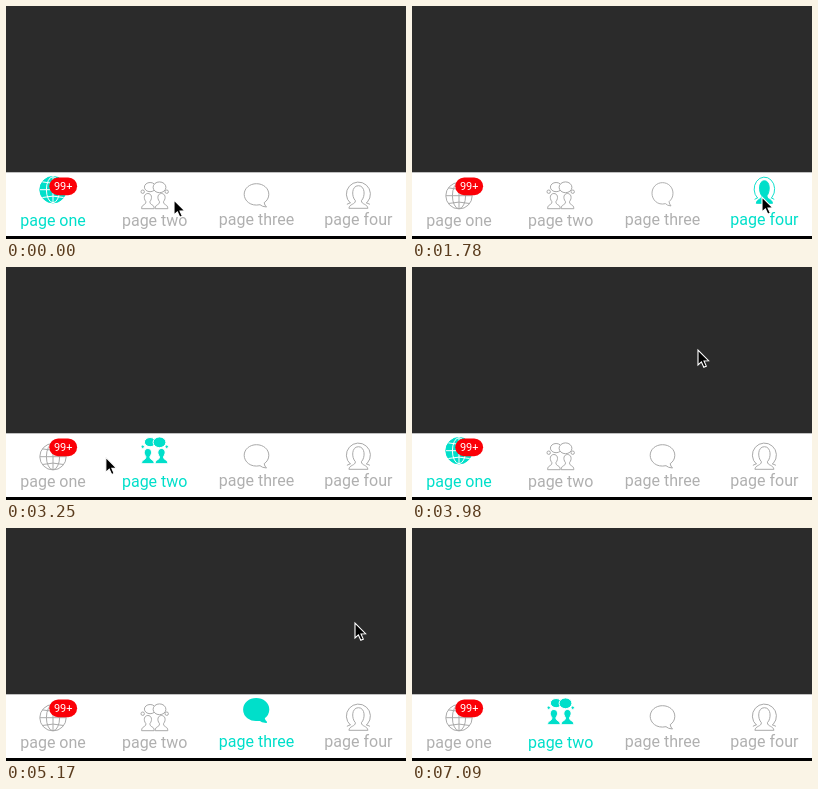
Write an HTML page with a canvas that moves like this. It is 400 px wide and 233 px high and loops after 7840 ms.

```html
<!DOCTYPE html>
<html lang="en">
<head>
<meta charset="utf-8">
<title>Bottom tab bar</title>
<style>
  html, body { margin: 0; width: 100%; height: 100%; overflow: hidden; background: #2b2b2b; }
  canvas { display: block; width: 400px; height: 233px; }
</style>
</head>
<body>
<canvas id="stage"></canvas>
<script>
const W = 400, H = 233, LOOP = 7840, FLIP = 400;
const TEAL = '#00dfca', GRAY = '#a9a9a9', LABEL = '#b0b0b0', RED = '#fb0007';

const canvas = document.getElementById('stage');
const ctx = canvas.getContext('2d');
const dpr = window.devicePixelRatio || 1;
canvas.width = W * dpr;
canvas.height = H * dpr;

const ANCHORS = [0, 1200, 2360, 3540, 4720, 5910, 7090];
const STEPS = [];
for (let i = 0; i < ANCHORS.length - 1; i++) {
  const span = ANCHORS[i + 1] - ANCHORS[i];
  for (let j = 0; j < 8; j++) STEPS.push(Math.round((ANCHORS[i] + span * j / 8) / 10) * 10);
}
STEPS.push(7090);

// [start time, tab]
const PICKS = [
  [-1000, 0], [180, 1], [640, 2], [1450, 3], [2260, 2], [2850, 1],
  [3390, 0], [4240, 1], [4720, 2], [5400, 3], [6310, 2], [6650, 1]
];

// [time, x, y] of the pointer tip
const POINTER = [
  [0, 168, 194], [250, 168, 194], [600, 256, 192], [800, 266, 191],
  [1050, 286, 191], [1400, 350, 191], [1800, 350, 191], [2360, 230, 190],
  [2500, 226, 190], [2800, 150, 191], [3000, 146, 191], [3390, 74, 190],
  [3540, 62, 188], [3700, 80, 170], [3980, 286, 83], [4080, 352, 84],
  [4290, 36, 96], [4560, 351, 92], [4740, 67, 90], [5020, 345, 90],
  [5170, 349, 95], [5230, 345, 95], [5440, 70, 84], [5760, 68, 81],
  [5910, 22, 70], [6060, 24, 68], [6210, 126, 76], [6350, 300, 88],
  [6520, 60, 80], [6700, 260, 86], [6900, 300, 90]
];
const POINTER_END = 6900;

const TABS = [
  { x: 47, base: 220, text: 'page one', icon: globe },
  { x: 148.7, base: 219.5, text: 'page two', icon: people },
  { x: 250.5, base: 219, text: 'page three', icon: bubble },
  { x: 352.4, base: 219, text: 'page four', icon: person }
];

const clamp = v => Math.max(0, Math.min(1, v));

function ellipse(x, y, rx, ry) {
  ctx.beginPath();
  ctx.ellipse(x, y, rx, ry, 0, 0, Math.PI * 2);
}

function paint(on) {
  ctx.fillStyle = on ? TEAL : '#fff';
  ctx.fill();
  ctx.stroke();
}

function globe(on) {
  ellipse(0, 0, 13.2, 13.2);
  paint(on);
  if (on) ctx.strokeStyle = '#fff';
  ellipse(0, 0, 6.6, 13);
  ctx.stroke();
  ctx.beginPath();
  ctx.moveTo(0, -13);
  ctx.lineTo(0, 13);
  ctx.moveTo(-13, 0);
  ctx.lineTo(13, 0);
  for (const s of [-1, 1]) {
    ctx.moveTo(-10.6, 7.8 * s);
    ctx.quadraticCurveTo(0, 5 * s, 10.6, 7.8 * s);
  }
  ctx.stroke();
}

function people(on) {
  if (on) ctx.strokeStyle = '#fff';
  ellipse(-4.6, -8.6, 5.7, 4.6);
  paint(on);
  ellipse(4.8, -8.4, 6.4, 5.4);
  paint(on);
  for (const s of [-1, 1]) {
    ellipse(12 * s, -4, 1.7, 1.7);
    paint(on);
    const x = 6.8 * s;
    ctx.beginPath();
    ctx.moveTo(x - 6.3, 13);
    ctx.bezierCurveTo(x - 6.3, 8, x - 2, 10, x - 2, 6);
    ctx.bezierCurveTo(x - 5, 2, x - 3.5, -2.2, x, -2.2);
    ctx.bezierCurveTo(x + 3.5, -2.2, x + 5, 2, x + 2, 6);
    ctx.bezierCurveTo(x + 2, 10, x + 6.3, 8, x + 6.3, 13);
    ctx.closePath();
    paint(on);
  }
}

function bubble(on) {
  if (on) ctx.translate(-0.3, -0.8);
  ctx.beginPath();
  ctx.moveTo(10, 11.3);
  ctx.quadraticCurveTo(5.5, 11, 3.5, 9);
  ctx.bezierCurveTo(-6, 11, -12.3, 5, -12.3, -1.4);
  ctx.bezierCurveTo(-12.3, -7.5, -6.8, -12, 0, -12);
  ctx.bezierCurveTo(6.8, -12, 12.3, -7.5, 12.3, -1.4);
  ctx.bezierCurveTo(12.3, 2.4, 10.5, 5, 7.7, 7);
  ctx.quadraticCurveTo(8, 9.5, 10, 11.3);
  ctx.closePath();
  if (on) ctx.lineWidth = 1.6;
  paint(on);
}

function person(on) {
  ctx.beginPath();
  ctx.arc(0, -1.6, 12, Math.PI * 0.73, Math.PI * 2.27);
  ctx.moveTo(-11.5, 8.6);
  ctx.lineTo(-7.8, 7);
  ctx.moveTo(11.5, 8.6);
  ctx.lineTo(7.8, 7);
  ctx.stroke();
  ctx.beginPath();
  ctx.moveTo(-9.5, 12.6);
  ctx.bezierCurveTo(-9, 8, -3, 9, -3, 5);
  ctx.bezierCurveTo(-7, 1, -7, -10, 0, -10);
  ctx.bezierCurveTo(7, -10, 7, 1, 3, 5);
  ctx.bezierCurveTo(3, 9, 9, 8, 9.5, 12.6);
  ctx.closePath();
  paint(on);
}

// 0 = resting, 1 = selected
function selection(i, t) {
  let n = 0;
  while (n + 1 < PICKS.length && PICKS[n + 1][0] <= t) n++;
  const p = clamp((t - PICKS[n][0]) / FLIP);
  if (PICKS[n][1] === i) return p;
  return n && PICKS[n - 1][1] === i ? 1 - p : 0;
}

function drawTab(tab, k) {
  const on = k > 0.5;
  ctx.save();
  ctx.translate(tab.x, 189.7 - 6 * k);
  ctx.scale(Math.max(0.02, Math.abs(Math.cos(k * Math.PI))), 1);
  ctx.lineWidth = 1;
  ctx.lineJoin = 'round';
  ctx.strokeStyle = on ? TEAL : GRAY;
  tab.icon(on);
  ctx.restore();

  ctx.font = '16px Roboto, sans-serif';
  ctx.textAlign = 'center';
  ctx.fillStyle = on ? TEAL : LABEL;
  ctx.fillText(tab.text, tab.x, tab.base);
}

function drawBadge() {
  ctx.beginPath();
  ctx.roundRect(43.3, 171.4, 27.8, 17.8, 8.9);
  ctx.fillStyle = RED;
  ctx.fill();
  ctx.font = '11px Roboto, sans-serif';
  ctx.fillStyle = '#fff';
  ctx.fillText('99+', 57.2, 184.4);
}

function drawPointer(t) {
  if (t >= POINTER_END) return;
  let n = 0;
  while (POINTER[n + 1][0] <= t) n++;
  const [t0, x0, y0] = POINTER[n], [t1, x1, y1] = POINTER[n + 1];
  const p = (t - t0) / (t1 - t0);
  ctx.save();
  ctx.translate(x0 + (x1 - x0) * p, y0 + (y1 - y0) * p);
  ctx.beginPath();
  ctx.moveTo(0, 0);
  ctx.lineTo(0, 15);
  ctx.lineTo(3.4, 11.9);
  ctx.lineTo(5.8, 17.2);
  ctx.lineTo(8.3, 16.1);
  ctx.lineTo(6, 10.9);
  ctx.lineTo(10.6, 10.7);
  ctx.closePath();
  ctx.fillStyle = '#000';
  ctx.fill();
  ctx.strokeStyle = '#fff';
  ctx.lineWidth = 1.1;
  ctx.stroke();
  ctx.restore();
}

function draw(t) {
  ctx.setTransform(dpr, 0, 0, dpr, 0, 0);
  ctx.fillStyle = '#2b2b2b';
  ctx.fillRect(0, 0, W, H);
  ctx.fillStyle = '#fff';
  ctx.fillRect(0, 166.3, W, 63.7);
  ctx.fillStyle = '#000';
  ctx.fillRect(0, 230, W, 3);
  TABS.forEach((tab, i) => drawTab(tab, selection(i, t)));
  drawBadge();
  drawPointer(t);
}

function tick() {
  const t = performance.now() % LOOP;
  let n = STEPS.length - 1;
  while (STEPS[n] > t) n--;
  draw(STEPS[n]);
  requestAnimationFrame(tick);
}
tick();
</script>
</body>
</html>
```
